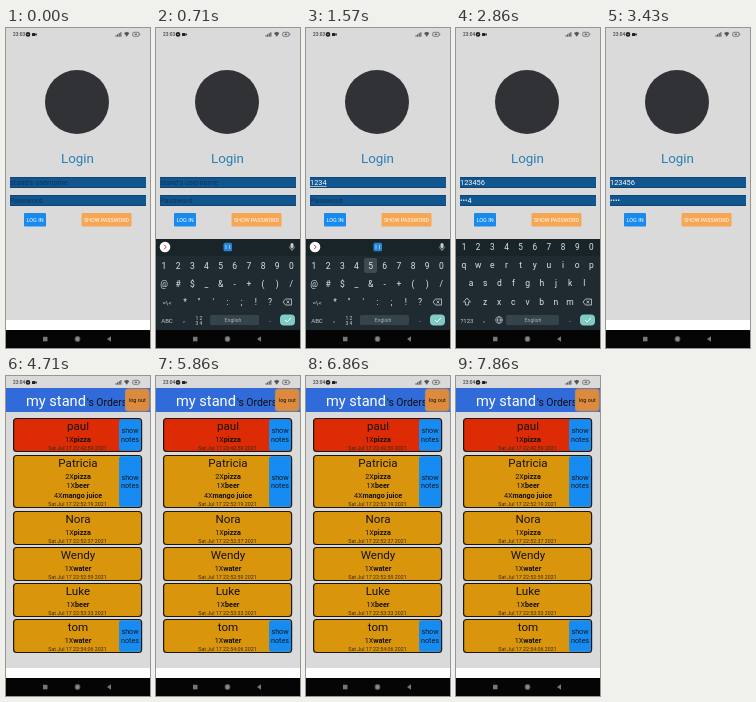
An HTML page with a canvas that plays this animation: 144x320 px, repeating every 8000 ms.

```html
<!DOCTYPE html>
<html lang="en">
<head>
<meta charset="utf-8">
<title>Stand orders</title>
<style>
html, body { margin: 0; width: 100%; height: 100%; overflow: hidden; background: #dadada; }
canvas { display: block; width: 144px; height: 320px; }
</style>
</head>
<body>
<canvas></canvas>
<script>
const LOOP = 8000;
const KEYBOARD_TOP = 211;
const NAV_TOP = 302;
const canvas = document.querySelector('canvas');
const ctx = canvas.getContext('2d');
const ratio = window.devicePixelRatio || 1;
canvas.width = 144 * ratio;
canvas.height = 320 * ratio;

const NAME_KEYS = [980, 1130, 1280, 1430, 1600, 1750];
const PASS_KEYS = [2330, 2470, 2610, 2750];
const ORDERS = [
  { name: 'paul', items: [[1, 'pizza']], time: '22:42:59', top: 42, color: '#dc2b05', notes: true },
  { name: 'Patricia', items: [[2, 'pizza'], [1, 'beer'], [4, 'mango juice']], time: '22:52:19', top: 79, notes: true },
  { name: 'Nora', items: [[1, 'pizza']], time: '22:52:37', top: 135 },
  { name: 'Wendy', items: [[1, 'water']], time: '22:52:59', top: 171 },
  { name: 'Luke', items: [[1, 'beer']], time: '22:53:33', top: 207 },
  { name: 'tom', items: [[1, 'water']], time: '22:54:06', top: 243, notes: true }
];

function rect(x, y, w, h, color) {
  ctx.fillStyle = color;
  ctx.fillRect(x, y, w, h);
}

function rounded(x, y, w, h, r, color, border, borderWidth = 1.2) {
  ctx.beginPath();
  ctx.roundRect(x, y, w, h, r);
  if (color) {
    ctx.fillStyle = color;
    ctx.fill();
  }
  if (border) {
    ctx.strokeStyle = border;
    ctx.lineWidth = borderWidth;
    ctx.stroke();
  }
}

function circle(x, y, r, color) {
  ctx.beginPath();
  ctx.arc(x, y, r, 0, Math.PI * 2);
  ctx.fillStyle = color;
  ctx.fill();
}

function polygon(points, color) {
  ctx.beginPath();
  points.forEach(([x, y]) => ctx.lineTo(x, y));
  ctx.closePath();
  ctx.fillStyle = color;
  ctx.fill();
}

function line(points, color, width = 0.8) {
  ctx.beginPath();
  points.forEach(([x, y]) => ctx.lineTo(x, y));
  ctx.strokeStyle = color;
  ctx.lineWidth = width;
  ctx.stroke();
}

function width(value, size, weight = 400) {
  ctx.font = `${weight} ${size}px Roboto, sans-serif`;
  return ctx.measureText(value).width;
}

function text(value, x, y, size, color, align = 'center', weight = 400) {
  const w = width(value, size, weight);
  ctx.textAlign = align;
  ctx.fillStyle = color;
  ctx.fillText(value, x, y);
  return w;
}

const progress = (t, from, to) => {
  const p = Math.min(1, Math.max(0, (t - from) / (to - from)));
  return p * p * (3 - 2 * p);
};
const typed = (t, keys) => keys.filter(at => t >= at).length;

function statusBar(t) {
  text(t < 2200 ? '23:03' : '23:04', 7, 8.3, 4.8, '#444', 'left', 500);
  circle(22, 6.4, 2.3, '#222');
  circle(22, 6.4, 0.7, '#bbb');
  rounded(26, 5, 3.4, 3, 0.6, '#222');
  polygon([[29, 6.5], [30.8, 5.2], [30.8, 7.8]], '#222');
  for (let i = 0; i < 4; i++) rect(109.5 + i * 1.6, 7.2 - i, 1.1, 1.5 + i, '#555');
  polygon([[118, 5], [120.7, 3.8], [123.4, 5], [120.7, 8.8]], '#555');
  rounded(126.7, 4.3, 6.3, 4, 1, '', '#666', 0.8);
  rect(128.7, 5.7, 2.3, 1.2, '#555');
  rect(133.4, 5.4, 0.8, 1.8, '#666');
}

function navBar() {
  rect(0, NAV_TOP, 144, 320 - NAV_TOP, '#050505');
  rect(37, 308.8, 4.5, 4.5, '#777');
  circle(71.5, 311, 2.9, '#555');
  circle(71.5, 311, 1.9, '#8a8a8a');
  polygon([[101, 311], [105, 308.3], [105, 313.7]], '#777');
}

function field(y, value, placeholder, underlined) {
  rect(4, y, 136, 11, '#12568f');
  rect(4, y, 136, 0.8, '#0d4271');
  rect(4, y + 10.2, 136, 0.8, '#0d4271');
  const w = text(value || placeholder, 4, y + 8.3, 7.4, value ? '#fff' : '#0e365c', 'left');
  if (value && underlined) rect(4, y + 9.2, w, 0.6, '#fff');
}

function login(t) {
  circle(71, 74, 32, '#303236');
  text('Login', 71.5, 134.5, 13.4, '#2b7fb2');

  const nameCount = typed(t, NAME_KEYS);
  const passCount = typed(t, PASS_KEYS);
  const last = PASS_KEYS[passCount - 1];
  const password = passCount && t - last < 600
    ? '•'.repeat(passCount - 1) + passCount
    : '•'.repeat(passCount);
  field(149, '123456'.slice(0, nameCount), 'stand\'s username', t < 2150);
  field(167, password, 'Password');

  rounded(18, 185, 22, 13.5, 1, '#198bef');
  text('LOG IN', 29, 193.6, 5.5, '#fff');
  rounded(75.5, 185, 50, 13.5, 1, '#f7a654');
  text('SHOW PASSWORD', 100.5, 193.6, 5.4, '#fff');
}

function keyRow(keys, x, y, step, size = 8.5) {
  [...keys].forEach((key, i) => text(key, x + i * step, y, size, '#dfe4e5'));
}

function backspace(ink) {
  line([[127, 274], [129.5, 271], [135.5, 271], [135.5, 277], [129.5, 277], [127, 274]], ink);
  line([[130.5, 272.7], [133.3, 275.3]], ink);
  line([[133.3, 272.7], [130.5, 275.3]], ink);
}

function keyboard(t) {
  const letters = t >= 2200;
  const ink = '#c9d0d2';
  rect(0, KEYBOARD_TOP, 144, 320 - KEYBOARD_TOP, '#1f2b31');
  rect(0, KEYBOARD_TOP, 144, 17, '#192429');

  const keys = letters ? PASS_KEYS : NAME_KEYS;
  const pressed = keys.findIndex(at => Math.abs(t - at) < 65);
  if (pressed >= 0) {
    rounded(1.5 + pressed * 14.15, letters ? 212 : 230, 13, 15, 2, '#3d4a4f');
  }

  if (letters) {
    keyRow('1234567890', 8, 222, 14.15, 8.2);
    keyRow('qwertyuiop', 8, 240, 14.15);
    keyRow('asdfghjkl', 15, 258, 14.15);
    keyRow('zxcvbnm', 29, 276.5, 14.15);
    line([[11, 270], [7.5, 274], [9.5, 274], [9.5, 277], [12.5, 277], [12.5, 274], [14.5, 274], [11, 270]], ink);
    text('?123', 11, 294.5, 6, ink);
    ctx.beginPath();
    ctx.arc(43, 292, 3.4, 0, Math.PI * 2);
    ctx.ellipse(43, 292, 1.5, 3.4, 0, 0, Math.PI * 2);
    ctx.strokeStyle = ink;
    ctx.lineWidth = 0.6;
    ctx.stroke();
    line([[39.6, 292], [46.4, 292]], ink, 0.6);
  } else {
    circle(9, 219, 5.3, '#fff');
    line([[8, 216.8], [10.2, 219], [8, 221.2]], '#d7425b', 1);
    rounded(67.5, 214.7, 8.5, 8.5, 1.5, '#2585d8');
    line([[70, 217], [70, 221]], '#b9ddfa');
    line([[73.5, 217], [73.5, 221]], '#b9ddfa');
    rounded(134.5, 215, 3, 5, 1.5, ink);
    line([[133.3, 218.5], [134.5, 221], [137.5, 221], [138.7, 218.5]], ink, 0.6);
    line([[136, 221], [136, 223]], ink, 0.7);
    keyRow('1234567890', 8, 241, 14.15);
    keyRow('@#$_&-+()/', 8, 258.5, 14.15);
    text('=\\<', 11, 276.5, 6.2, ink);
    keyRow('*"\':;!?', 29, 277, 14.15);
    text('ABC', 11, 294.5, 6, ink);
    text('1 2', 43, 291.5, 5, ink);
    text('3 4', 43, 296.5, 5, ink);
  }

  backspace(ink);
  text(',', 28, 294, 8, ink);
  const start = letters ? 50 : 54;
  rounded(start, 287, 103 - start, 10, 1.5, '#35434a');
  text('English', 77, 294, 5.2, '#a9b4b9');
  text('.', 114, 294, 8, ink);
  rounded(124, 286.5, 15, 11, 4, '#80cbc4');
  line([[129, 292], [131, 294], [135, 290]], '#fff', 1);
}

function order({ name, items, time, top, color = '#d9960d', notes }) {
  const height = 33 + (items.length - 1) * 9.5;
  rounded(7.6, top + 0.5, 128, height, 3, color, '#1b1712');
  text(name, 72, top + 12, 11.6, '#15110a');
  items.forEach(([count, item], i) => {
    const prefix = count + 'X';
    const prefixWidth = width(prefix, 7.2);
    const x = 72 - (prefixWidth + width(item, 7.2, 700)) / 2;
    const y = top + 23.7 + i * 9.5;
    text(prefix, x, y, 7.2, '#15110a', 'left');
    text(item, x + prefixWidth, y, 7.2, '#15110a', 'left', 700);
  });
  text(`Sat Jul 17 ${time} 2021`, 71.5, top + height - 1, 5.3, '#3a2910');
  if (notes) {
    rounded(113, top + 1.2, 22, height - 1.4, 2.5, '#168cf2');
    const middle = top + height / 2;
    text('show', 124, middle - 1.5, 7.2, '#101820');
    text('notes', 124, middle + 7, 7.2, '#101820');
  }
}

function orders(t) {
  rect(0, 12, 144, 24, '#306bd9');
  text('my stand', 20, 30, 14.6, '#fff', 'left');
  text('\'s Orders', 81, 30, 10.4, '#101010', 'left');
  rounded(119.5, 13, 23.5, 22, 3, '#dc8b3e', '#b98a5c');
  text('log out', 131.3, 25.7, 5.5, '#15110a');
  if (t >= 4200) ORDERS.forEach(order);
}

function draw(t) {
  ctx.setTransform(ratio, 0, 0, ratio, 0, 0);
  rect(0, 0, 144, 320, '#dadada');
  rect(0, 292, 144, NAV_TOP - 292, '#fff');
  statusBar(t);
  if (t < 3500) login(t);
  else orders(t);

  const shown = progress(t, 420, 700) - progress(t, 3060, 3260);
  if (shown > 0) {
    ctx.save();
    ctx.translate(0, (1 - shown) * (320 - KEYBOARD_TOP));
    keyboard(t);
    ctx.restore();
  }
  navBar();
}

function tick() {
  draw(performance.now() % LOOP);
  requestAnimationFrame(tick);
}
tick();
</script>
</body>
</html>
```
